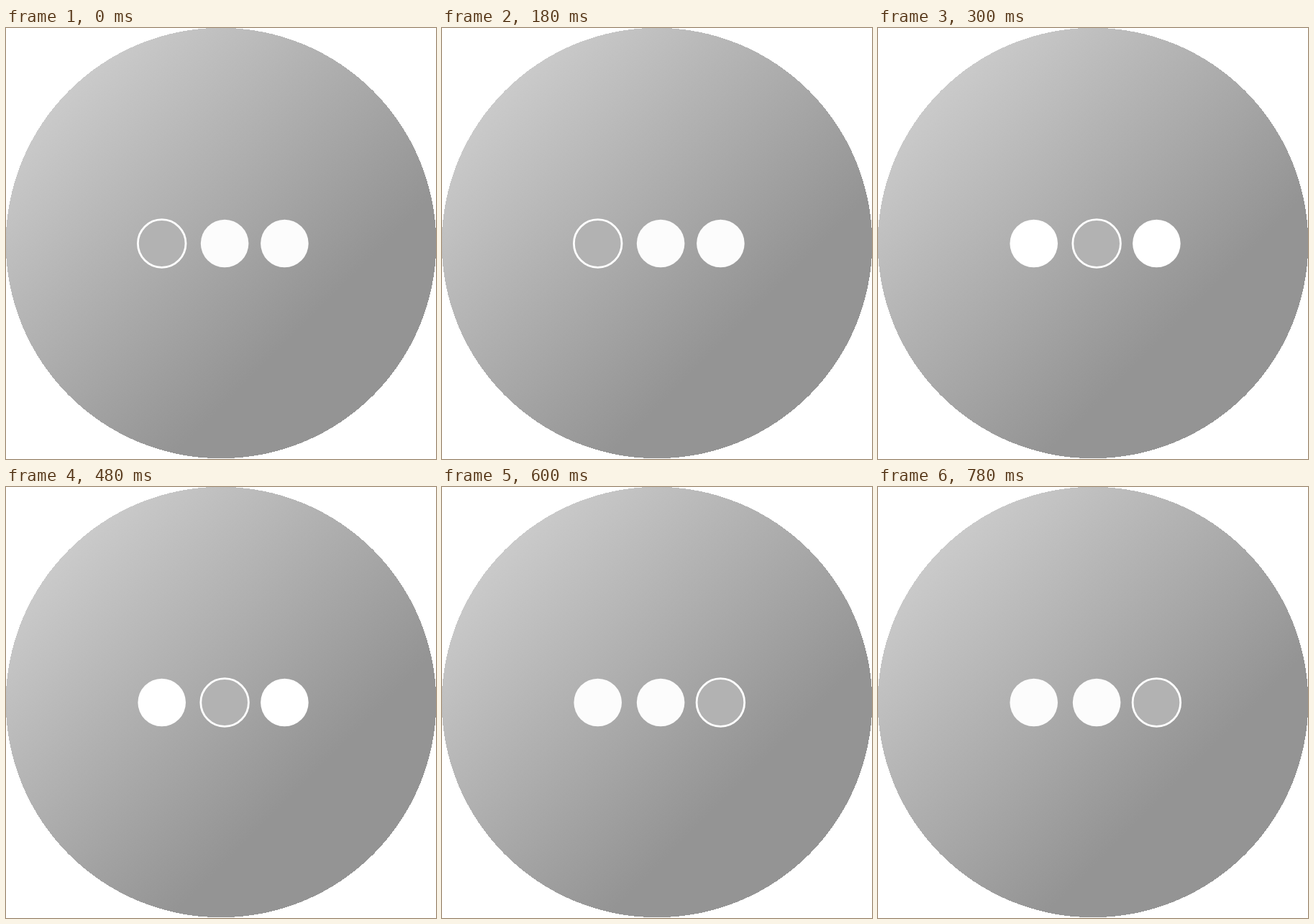
An HTML page for the animation above (900 ms loop, 598 by 600 pixels).

```html
<!DOCTYPE html>
<html lang="en">
<head>
<meta charset="utf-8">
<title>Typing dots</title>
<style>
  html, body { margin: 0; width: 100%; height: 100%; overflow: hidden; background: #fff; }
  svg { display: block; width: 598px; height: 600px; }
</style>
</head>
<body>
<svg viewBox="0 0 598 600">
  <defs>
    <linearGradient id="shade" gradientUnits="userSpaceOnUse" x1="88" y1="88" x2="414" y2="414">
      <stop offset="0" stop-color="#cacaca"/>
      <stop offset="1" stop-color="#949494"/>
    </linearGradient>
  </defs>
  <ellipse cx="299" cy="299.5" rx="299.3" ry="299.7" fill="url(#shade)" shape-rendering="crispEdges"/>
  <g id="dots"></g>
</svg>
<script>
  const STEP = 300;
  const centers = [216.7, 304.1, 387.4];
  const group = document.getElementById('dots');

  function setAttrs(node, attrs) {
    for (const key in attrs) node.setAttribute(key, attrs[key]);
  }

  const dots = centers.map(cx => {
    const dot = document.createElementNS('http://www.w3.org/2000/svg', 'circle');
    setAttrs(dot, { cx, cy: 300 });
    return group.appendChild(dot);
  });

  // One dot at a time is hollow; the solid pair is brightest on the middle step.
  function draw(time) {
    const active = Math.floor(time / STEP) % dots.length;
    const solid = active === 1 ? '#fff' : '#fcfcfc';
    dots.forEach((dot, i) => setAttrs(dot, i === active
      ? { r: 33.3, fill: '#b2b2b2', stroke: '#fff', 'stroke-width': 2.8 }
      : { r: 33.3, fill: solid, stroke: 'none' }));
  }

  const start = performance.now();
  function tick() {
    draw(performance.now() - start);
    requestAnimationFrame(tick);
  }
  tick();
</script>
</body>
</html>
```
